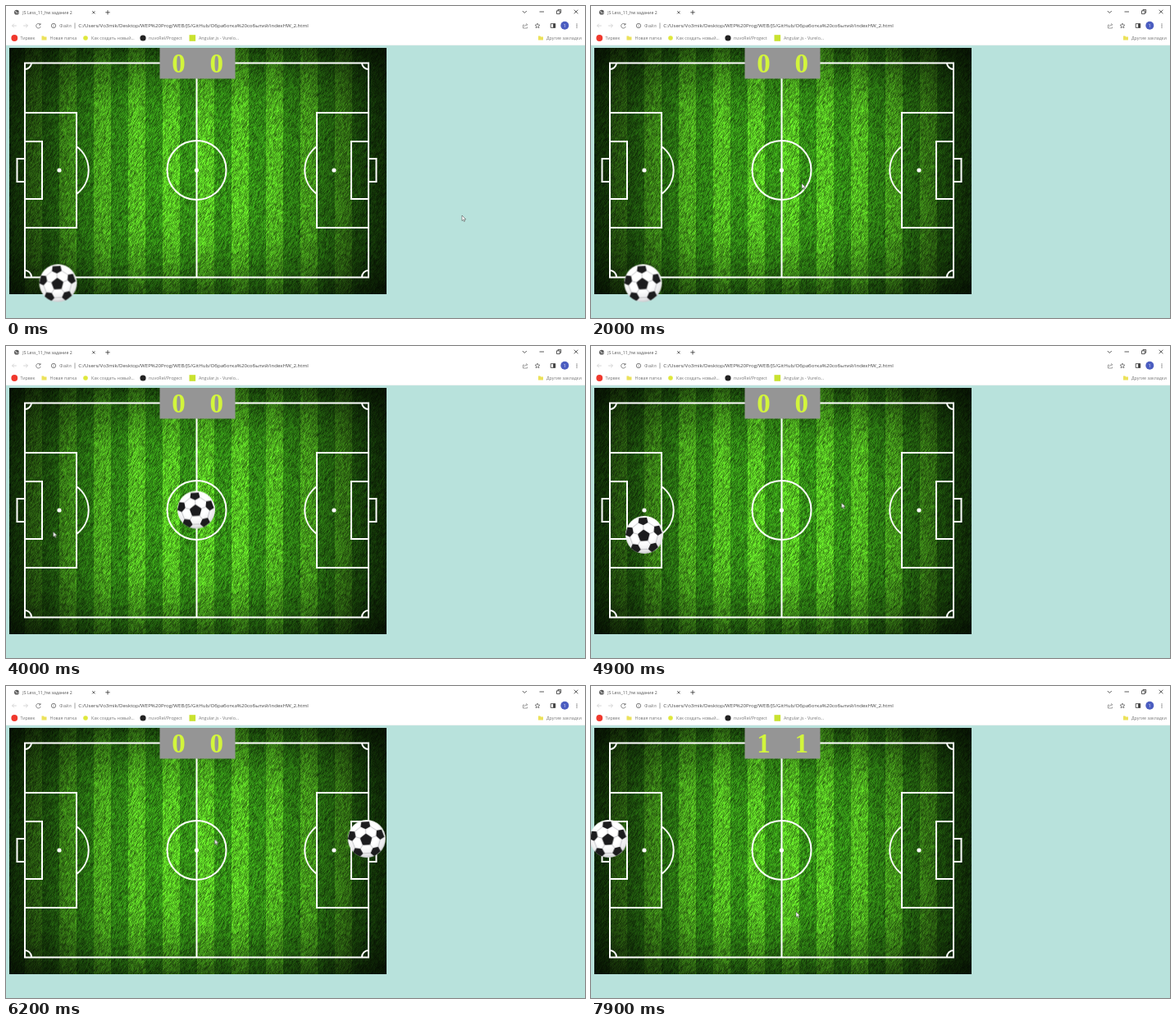
An HTML page with a canvas for the animation above (8 s loop, 706 by 380 pixels).

```html
<!DOCTYPE html>
<html lang="ru">
<head>
<meta charset="utf-8">
<title>Football field</title>
<style>
  html, body { margin: 0; width: 706px; height: 380px; overflow: hidden; background: #b8e2dc; }
  canvas, svg { position: absolute; left: 0; top: 0; }
  canvas { left: 4px; top: 51px; }
  text { font-family: "Open Sans", "Noto Sans", sans-serif; }
  .url { font-size: 6.15px; fill: #444; }
  .tab { font-size: 5.2px; fill: #555; }
  .mark { font-size: 5.3px; fill: #777; }
  .score text { font: bold 33px "Liberation Serif", "Noto Serif", serif; fill: #d2f53c; text-anchor: middle; }
  .line { fill: none; stroke: #fff; stroke-width: 2; }
  .icon { fill: none; stroke: #666; stroke-width: .8; }

  #ball { animation: ball 8s infinite cubic-bezier(.25, .1, .25, 1); }
  @keyframes ball {
    0%, 35% { transform: translate(63.5px, 337.5px); }
    45%, 51.9% { transform: translate(232px, 199.5px); }
    61.9%, 68.1% { transform: translate(64.7px, 230px); }
    78.1%, 88.4% { transform: translate(440.5px, 186px); }
    98.4%, 100% { transform: translate(21.5px, 186px); }
  }

  #cursor { animation: cursor 8s infinite ease-in-out; }
  @keyframes cursor {
    0%, 9% { transform: translate(556px, 255px); }
    21% { transform: translate(259px, 217px); }
    25% { transform: translate(257px, 216px); }
    34%, 40% { transform: translate(232px, 200px); }
    50% { transform: translate(57.5px, 226px); }
    52%, 55% { transform: translate(64px, 230px); animation-timing-function: ease-in; }
    61.25% { transform: translate(305px, 191px); animation-timing-function: ease-out; }
    66.5%, 69% { transform: translate(440px, 186px); }
    77.5% { transform: translate(254.5px, 186.5px); }
    87%, 89% { transform: translate(20px, 183px); }
    91.25% { transform: translate(18px, 182px); }
    98.75%, 100% { transform: translate(250px, 275px); }
  }

  .before, .after { animation: 8s infinite step-end; }
  .left .before { animation-name: leftOff; }
  .left .after { animation-name: leftOn; }
  .right .before { animation-name: rightOff; }
  .right .after { animation-name: rightOn; }
  @keyframes leftOff { 0% { opacity: 1; } 97.7%, 100% { opacity: 0; } }
  @keyframes leftOn { 0% { opacity: 0; } 97.7%, 100% { opacity: 1; } }
  @keyframes rightOff { 0% { opacity: 1; } 78.2%, 100% { opacity: 0; } }
  @keyframes rightOn { 0% { opacity: 0; } 78.2%, 100% { opacity: 1; } }
</style>
</head>
<body>
<canvas id="grass" width="460" height="300"></canvas>
<svg width="706" height="380" viewBox="0 0 706 380">
  <defs>
    <radialGradient id="shade" cx=".45" cy=".35" r=".68">
      <stop offset=".55" stop-color="#fff"/>
      <stop offset=".85" stop-color="#e8e8ea"/>
      <stop offset="1" stop-color="#bfc0c4"/>
    </radialGradient>
    <clipPath id="round"><circle r="23"/></clipPath>
    <g id="patch">
      <path d="M0-13L6-16 4.8-22h-9.6L-6-16z" fill="#1c1c1e"/>
      <path d="M0-7V-13M6-16L13.4-10.6" stroke="#b4b4b8" stroke-width=".7"/>
    </g>
    <g id="half" class="line">
      <path d="M23 130H86V270H23M23 165H44V235H23M23 186H13.5V214H23"/>
      <path d="M86 171A36 36 0 0 1 86 229M31 70A8 8 0 0 1 23 77M31 330A8 8 0 0 0 23 322"/>
      <circle cx="65" cy="200" r="2.6" fill="#fff" stroke="none"/>
    </g>
    <path id="folder" d="M-3-2.5h2.4l.8 1H3v4h-6z" fill="#ece25a"/>
  </defs>

  <!-- Browser window -->
  <rect width="706" height="48" fill="#fff"/>
  <path d="M0 47.7H706" stroke="#e3ebea" stroke-width=".6"/>
  <circle cx="13" cy="7.7" r="2.9" fill="#555"/>
  <path d="M11 6.5l2 .8-.7 1.8M14 9.2l1.3-1.8" stroke="#fff" stroke-width=".8" fill="none"/>
  <text class="tab" x="20.3" y="9.6">JS Less_11_hw задание 2</text>
  <g class="icon">
    <path d="M105.2 6.2l3.2 3.2m0-3.2l-3.2 3.2M121.3 7.8h5.4m-2.7-2.7v5.4" stroke="#333"/>
    <path d="M629.8 6l2.5 2.5L634.8 6M650.5 7H656M671.5 5.8h3.8v3.8h-3.8zM673 5.8V4.4h3.7v3.8h-1.4M692.8 4.7l4.6 4.6m0-4.6l-4.6 4.6" stroke="#333"/>
    <path d="M12.8 24H7.5m2.3-2.3L7.5 24l2.3 2.3M21.2 24h5.3m-2.3-2.3l2.3 2.3-2.3 2.3" stroke="#ccc"/>
    <path d="M41.8 22.6A2.8 2.8 0 1 0 42.2 25M42 21v2h-2"/>
    <circle cx="58" cy="24" r="2.7"/>
    <path d="M58 23.6v1.8M58 22.2v.6M84 20.5v7" stroke-width=".6"/>
    <path d="M632 23h-1.5v4h5v-1.5M632 25.2q.4-2.5 3.6-2.5m-1.3-1.5l1.5 1.5-1.5 1.5" stroke="#888"/>
    <path d="M648 21l.9 2 2.1.2-1.6 1.4.5 2.2-1.9-1.2-1.9 1.2.5-2.2-1.6-1.4 2.1-.2z"/>
    <path d="M664.2 21.6h5.6v4.8h-5.6z" stroke="#333"/>
    <path d="M668.4 21.6v4.8" stroke="#333" stroke-width="2.4"/>
  </g>
  <text class="url" x="65" y="26.2" style="font-size:5.8px;fill:#777">Файл</text>
  <text class="url" x="88.3" y="26.2">C:/Users/Vo3mik/Desktop/WEP%20Prog/WEB/JS/GitHub/Обработка%20событий/indexHW_2.html</text>
  <circle cx="681.3" cy="23.8" r="5" fill="#4b5dc0"/>
  <text x="681.3" y="25.7" font-size="5" fill="#fff" text-anchor="middle">1</text>
  <path d="M696 21.4v5.4" stroke="#555" stroke-width="1.1" stroke-dasharray="1.1 1.05"/>

  <circle cx="10.3" cy="39" r="3.9" fill="#f0382d"/>
  <use href="#folder" x="46.5" y="39"/>
  <circle cx="97" cy="39" r="2.8" fill="#dfe83c"/>
  <circle cx="167" cy="39" r="3.6" fill="#222"/>
  <rect x="223.5" y="35.2" width="7.6" height="7.6" fill="#c9e22f"/>
  <use href="#folder" x="652" y="39"/>
  <g class="mark">
    <text x="17.5" y="40.9">Тирвек</text>
    <text x="53.5" y="40.9">Новая папка</text>
    <text x="104" y="40.9">Как создать новый...</text>
    <text x="174" y="40.9">nuvoRel/Progect</text>
    <text x="235" y="40.9">Angular.js - Vurelo...</text>
    <text x="659" y="40.9">Другие закладки</text>
  </g>

  <!-- Pitch -->
  <path class="line" d="M23 69.5H442V330.5H23zM232.5 69.5V330.5"/>
  <circle class="line" cx="232.5" cy="200" r="36"/>
  <circle cx="232.5" cy="200" r="2.6" fill="#fff"/>
  <use href="#half"/>
  <use href="#half" transform="matrix(-1 0 0 1 465 0)"/>

  <rect x="187.5" y="51" width="92" height="37.5" fill="#959595"/>
  <g class="score">
    <g class="left">
      <text class="before" x="210.5" y="81">0</text>
      <text class="after" x="210.5" y="81">1</text>
    </g>
    <g class="right">
      <text class="before" x="256.7" y="81">0</text>
      <text class="after" x="256.7" y="81">1</text>
    </g>
  </g>

  <g id="ball">
    <circle r="23" fill="url(#shade)"/>
    <g clip-path="url(#round)">
      <g transform="translate(-.7 1.2) rotate(-3)">
        <path d="M0-7.8L7.4-2.4 4.6 6.3H-4.6L-7.4-2.4z" fill="#1c1c1e"/>
        <use href="#patch"/>
        <use href="#patch" transform="rotate(72)"/>
        <use href="#patch" transform="rotate(144)"/>
        <use href="#patch" transform="rotate(216)"/>
        <use href="#patch" transform="rotate(288)"/>
      </g>
    </g>
  </g>

  <g id="cursor">
    <path d="M0 0V6.6L1.5 5.2 2.5 7.5 3.6 7 2.6 4.8H4.7z" fill="#fff" stroke="#333" stroke-width=".5"/>
  </g>
</svg>
<script>
  const canvas = document.getElementById('grass');
  const ctx = canvas.getContext('2d');
  const { width: w, height: h } = canvas;
  const image = ctx.createImageData(w, h);

  let seed = 7;
  const random = () => (seed = seed * 16807 % 2147483647) / 2147483647;
  const noise = Float32Array.from({ length: w * (h + 4) }, random);

  const light = [86, 192, 34];
  const dark = [52, 142, 22];
  const stripe = 20.95;

  for (let y = 0; y < h; y++) {
    for (let x = 0; x < w; x++) {
      const i = y * w + x;
      // Slanted averages make short blades.
      const blade = (noise[i] + noise[i + w - 1] + noise[i + 2 * w - 1]) / 3;
      const dx = Math.abs(x / w * 2 - 1);
      const dy = Math.abs(y / h * 2 - 1);
      const glow = Math.exp(-1.3 * dx ** 3 - 0.8 * dy ** 4);
      const band = Math.floor((x - 19) / stripe);
      const inside = band >= 0 && band < 20;
      const base = inside && band % 2 === 0 ? light : dark;
      const level = glow * (0.45 + 1.1 * blade);
      base.forEach((c, k) => { image.data[i * 4 + k] = c * level; });
      image.data[i * 4 + 3] = 255;
    }
  }
  ctx.putImageData(image, 0, 0);
</script>
</body>
</html>
```
